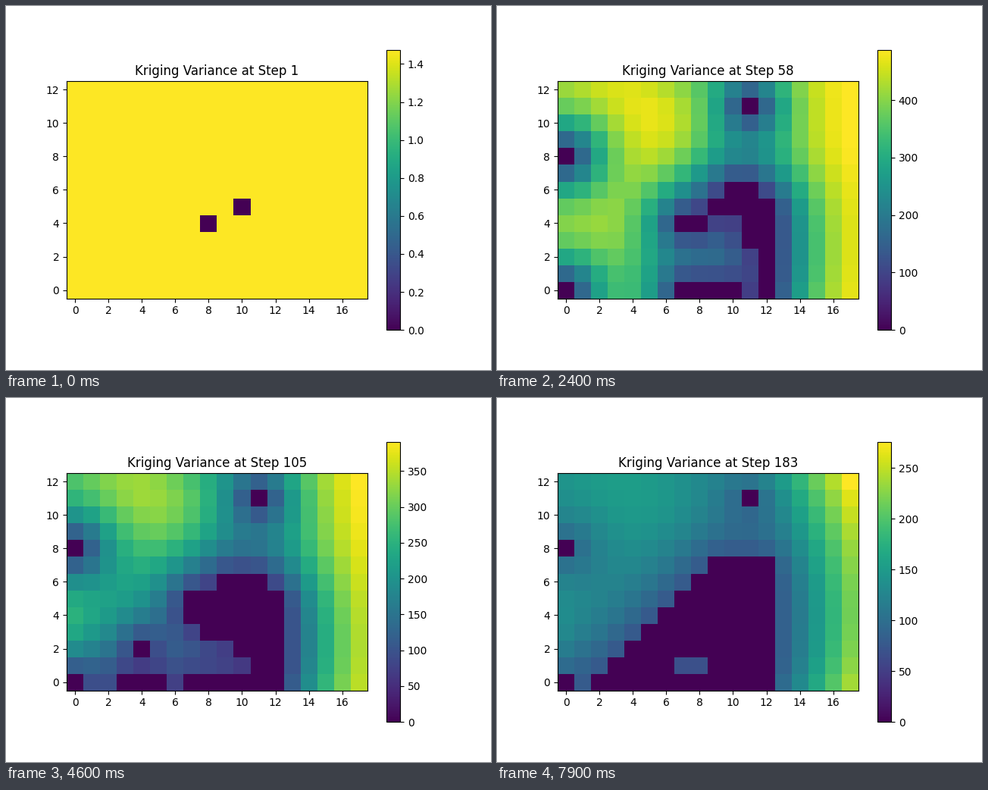
These frames come from a looping animation (640 by 480 pixels, 8 s). A matplotlib script:

```python
import numpy as np
import matplotlib.pyplot as plt
from matplotlib.animation import FuncAnimation

NX, NY = 18, 13
FRAMES, INTERVAL = 80, 100

# Timeline: frame, step counter, peak variance, variogram range, nugget share
TIMES = [0, 11, 24, 36, 46, 64, 79]
STEPS = [1, 34, 58, 82, 105, 149, 183]
PEAKS = [1.475, 565, 488, 413, 391, 297, 276]
RANGES = [7.4, 7.4, 7.2, 7.4, 9, 30, 30]
NUGGETS = [0.008, 0.008, 0, 0, 0.03, 0.087, 0.087]
SMOOTH_UNTIL = 17  # Gaussian variogram before this frame, spherical after


def row(y, a, b=None):
    b = a if b is None else b
    return [(x, y) for x in range(a, b + 1)]


def col(x, a, b):
    return [(x, y) for y in range(a, b + 1)]


# Cells sampled in each phase, in order of visit
START = [(8, 4), (10, 5)]
PHASES = [
    row(5, 9) + row(4, 7) + row(5, 11, 12) + row(6, 10, 11) + row(4, 11)
    + [(11, 11), (0, 8), (0, 0)] + row(3, 11) + col(12, 0, 4)[::-1]
    + row(0, 7, 10)[::-1],
    [],
    row(4, 9, 10) + row(5, 8) + row(3, 10) + col(11, 0, 2)[::-1]
    + [(4, 0), (4, 2)],
    row(3, 8, 9) + row(5, 7) + row(6, 9) + row(2, 10) + [(5, 0), (3, 0)],
    row(6, 12) + row(7, 9, 12)[::-1] + row(3, 6, 7)[::-1] + row(2, 5, 6)[::-1]
    + row(1, 4, 6) + row(0, 6) + row(1, 10) + row(2, 9),
    row(2, 7, 8) + row(1, 9) + row(6, 8) + row(4, 6) + row(3, 5)
    + row(1, 3) + row(0, 2),
]
OUTSIDE = [(7, 16), (0, 17), (-5, 13)]  # samples beyond the visible grid

gx, gy = np.meshgrid(np.arange(NX), np.arange(NY))
GRID = np.column_stack([gx.ravel(), gy.ravel()]).astype(float)


def at(n, values):
    return float(np.interp(n, TIMES, values))


def sampled(n):
    cells = list(START)
    for t0, t1, new in zip(TIMES, TIMES[1:], PHASES):
        share = np.clip((n - t0) / (t1 - t0), 0, 1)
        cells += new[:int(len(new) * share + 1e-9)]
    return cells


def correlation(a, b, reach, smooth):
    d = np.hypot(a[:, None, 0] - b[None, :, 0], a[:, None, 1] - b[None, :, 1])
    if smooth:
        return np.exp(-(d / (reach * 4 / 7)) ** 2)
    u = np.minimum(d / reach, 1)
    return 1 - 1.5 * u + 0.5 * u ** 3


def variance(n):
    """Ordinary kriging variance on the grid, scaled to the current peak."""
    cells = sampled(n)
    pts = np.array(cells + OUTSIDE, float)
    m = len(pts)
    nugget = 1.0 if n == 0 else at(n, NUGGETS)
    reach, smooth = at(n, RANGES), n < SMOOTH_UNTIL

    system = np.ones((m + 1, m + 1))
    system[:m, :m] = ((1 - nugget) * correlation(pts, pts, reach, smooth)
                      + (nugget + 1e-9) * np.eye(m))
    system[m, m] = 0
    rhs = np.ones((m + 1, len(GRID)))
    rhs[:m] = (1 - nugget) * correlation(pts, GRID, reach, smooth)

    weights = np.linalg.solve(system, rhs)
    var = 1 - np.sum(weights * rhs, axis=0)
    var = np.maximum(var, 0).reshape(NY, NX)
    for x, y in cells:
        var[y, x] = 0
    return var * at(n, PEAKS) / var.max()


fig, ax = plt.subplots(figsize=(6.4, 4.8), dpi=100)
image = ax.imshow(variance(0), origin="lower", cmap="viridis",
                  vmin=0, vmax=PEAKS[0])
fig.colorbar(image)
title = ax.set_title("")


def draw(n):
    image.set_data(variance(n))
    image.set_clim(0, at(n, PEAKS))
    title.set_text(f"Kriging Variance at Step {round(at(n, STEPS))}")
    return image, title


anim = FuncAnimation(fig, draw, frames=FRAMES, init_func=lambda: draw(0),
                     interval=INTERVAL, repeat=True, repeat_delay=0)
plt.show()
```
